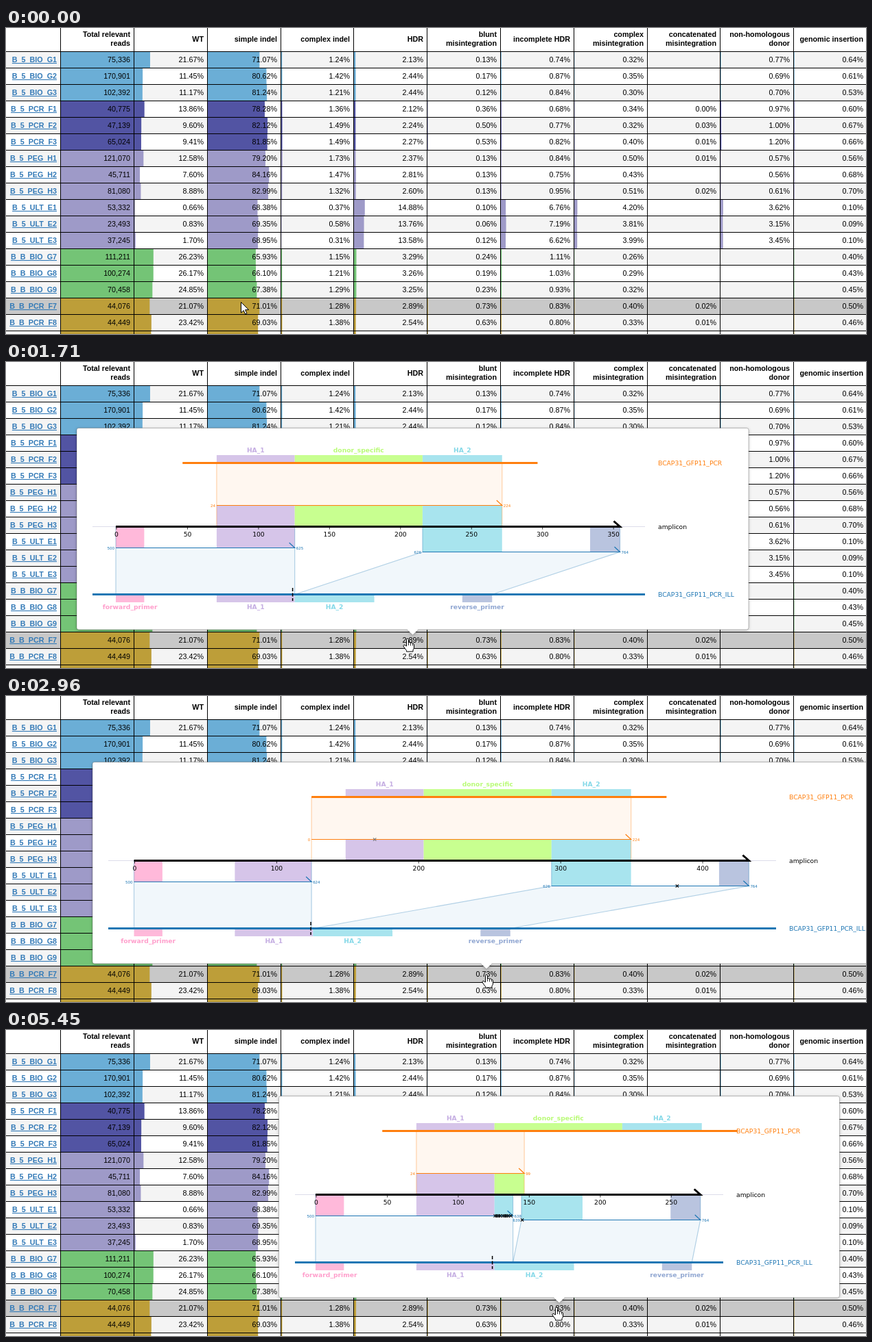
An HTML page that plays this animation: 1253 px wide and 447 px high, repeating every 7.16 s.

```html
<!DOCTYPE html>
<html lang="en">
<head>
<meta charset="utf-8">
<title>Read outcome table</title>
<style>
html, body { margin: 0; width: 100%; height: 100%; overflow: hidden; background: #fff; }
svg { display: block; width: 1253px; height: 447px; }
.table text { font: 10.75px "Liberation Sans", Arial, sans-serif; text-anchor: end; }
.table .bold { font-weight: bold; }
.table .link { fill: #337ab7; font-weight: bold; text-decoration: underline; }
.tip text { font: 9.2px "DejaVu Sans", sans-serif; }
.tip .mid { text-anchor: middle; }
.tip .end { text-anchor: end; }
.tip .bold { font-weight: bold; }
.tip .small { font-size: 5.5px; }
.panel { fill: #fff; stroke: rgba(0,0,0,.24); filter: drop-shadow(0 1px 2px rgba(0,0,0,.25)); }

.tip, #arrow, #hand { animation: 7160ms step-end infinite; }
#tip1 { animation-name: tip1; }
#tip2 { animation-name: tip2; }
#tip3 { animation-name: tip3; }
#tip4 { animation-name: tip4; }
#arrow { animation-name: arrow; }
#hand { animation-name: hand; }
#cursor { animation: move 7160ms step-end infinite; }

@keyframes tip1 {
  0% { opacity: 0 } 5.307% { opacity: .17 } 6.355% { opacity: .6 } 7.402% { opacity: 1 }
  12.988% { opacity: .8 } 14.064% { opacity: .35 } 15.126% { opacity: .05 } 16.201%, 100% { opacity: 0 }
}
@keyframes tip2 {
  0% { opacity: 0 } 21.648% { opacity: .17 } 22.765% { opacity: .6 } 23.882% { opacity: 1 }
  35.824% { opacity: .75 } 36.872% { opacity: .3 } 37.919%, 100% { opacity: 0 }
}
@keyframes tip3 {
  0% { opacity: 0 } 38.966% { opacity: .17 } 40.154% { opacity: .6 } 41.34% { opacity: 1 }
  67.304% { opacity: .75 } 68.408% { opacity: .3 } 69.511%, 100% { opacity: 0 }
}
@keyframes tip4 {
  0% { opacity: 0 } 73.911% { opacity: .17 } 75.014% { opacity: .6 } 76.117%, 100% { opacity: 1 }
}
@keyframes hand {
  0% { opacity: 0 } 5.307% { opacity: 1 } 12.988% { opacity: 0 } 20.573% { opacity: 1 }
  35.824% { opacity: 0 } 38.966% { opacity: 1 } 66.201% { opacity: 0 } 72.807%, 100% { opacity: 1 }
}
@keyframes arrow {
  0% { opacity: 1 } 5.307% { opacity: 0 } 12.988% { opacity: 1 } 20.573% { opacity: 0 }
  35.824% { opacity: 1 } 38.966% { opacity: 0 } 66.201% { opacity: 1 } 72.807%, 100% { opacity: 0 }
}
@keyframes move {
  0% { transform: translate(342px, 400px) }
  3.212% { transform: translate(342px, 400px); animation-timing-function: steps(4, jump-both) }
  7.402% { transform: translate(367px, 405px) }
  12.988% { transform: translate(367px, 405px); animation-timing-function: steps(3, jump-both) }
  16.201% { transform: translate(502px, 399px); animation-timing-function: steps(4, end) }
  20.573% { transform: translate(580px, 404px); animation-timing-function: steps(2, end) }
  22.765% { transform: translate(585px, 404px) }
  34.776% { transform: translate(585px, 404px); animation-timing-function: steps(4, jump-both) }
  38.966% { transform: translate(694px, 406px); animation-timing-function: steps(2, end) }
  41.34% { transform: translate(700px, 407px) }
  62.849% { transform: translate(703px, 408px) }
  64.106% { transform: translate(713px, 410px) }
  66.201% { transform: translate(713px, 410px); animation-timing-function: steps(6, jump-both) }
  72.807% { transform: translate(794px, 407px); animation-timing-function: steps(3, end) }
  76.117%, 100% { transform: translate(802px, 405px) }
}
</style>
</head>
<body>
<svg id="stage" viewBox="0 0 1253 447" xmlns="http://www.w3.org/2000/svg">
  <g id="table" class="table"></g>
  <g id="tips"></g>
  <g id="cursor" fill="#fff" stroke="#000" stroke-linejoin="round">
    <path id="arrow" d="M.5 .5V16L4.2 12.6L6.7 18L9 17L6.6 11.7H11.6Z"/>
    <g id="hand">
      <path d="M-1.5 11V1.5a1.5 1.5 0 0 1 3 0V6.5a1.5 1.3 0 0 1 3 .5a1.5 1.3 0 0 1 3 .7a1.4 1.4 0 0 1 2 1V13q0 2-1.5 3.5V19H-1.5V17.5L-5.5 12q-1.2-2 .3-2.6q1.4-.4 2.4 1Z"/>
      <path fill="none" stroke-width=".8" d="M1.5 6.5V10M4.5 7V10.5M7.5 8V10.5"/>
    </g>
  </g>
</svg>
<script>
const rows = `
B_5_BIO_G1 75,336 21.67 71.07 1.24 2.13 0.13 0.74 0.32 - 0.77 0.64
B_5_BIO_G2 170,901 11.45 80.62 1.42 2.44 0.17 0.87 0.35 - 0.69 0.61
B_5_BIO_G3 102,392 11.17 81.24 1.21 2.44 0.12 0.84 0.30 - 0.70 0.53
B_5_PCR_F1 40,775 13.86 78.28 1.36 2.12 0.36 0.68 0.34 0.00 0.97 0.60
B_5_PCR_F2 47,139 9.60 82.12 1.49 2.24 0.50 0.77 0.32 0.03 1.00 0.67
B_5_PCR_F3 65,024 9.41 81.85 1.49 2.27 0.53 0.82 0.40 0.01 1.20 0.66
B_5_PEG_H1 121,070 12.58 79.20 1.73 2.37 0.13 0.84 0.50 0.01 0.57 0.56
B_5_PEG_H2 45,711 7.60 84.16 1.47 2.81 0.13 0.75 0.43 - 0.56 0.68
B_5_PEG_H3 81,080 8.88 82.99 1.32 2.60 0.13 0.95 0.51 0.02 0.61 0.70
B_5_ULT_E1 53,332 0.66 68.38 0.37 14.88 0.10 6.76 4.20 - 3.62 0.10
B_5_ULT_E2 23,493 0.83 69.35 0.58 13.76 0.06 7.19 3.81 - 3.15 0.09
B_5_ULT_E3 37,245 1.70 68.95 0.31 13.58 0.12 6.62 3.99 - 3.45 0.10
B_B_BIO_G7 111,211 26.23 65.93 1.15 3.29 0.24 1.11 0.26 - - 0.40
B_B_BIO_G8 100,274 26.17 66.10 1.21 3.26 0.19 1.03 0.29 - - 0.43
B_B_BIO_G9 70,458 24.85 67.38 1.29 3.25 0.23 0.93 0.32 - - 0.45
B_B_PCR_F7 44,076 21.07 71.01 1.28 2.89 0.73 0.83 0.40 0.02 - 0.50
B_B_PCR_F8 44,449 23.42 69.03 1.38 2.54 0.63 0.80 0.33 0.01 - 0.46
B_B_PCR_F9 44,210 23.10 69.20 1.35 2.60 0.65 0.81 0.35 0.01 - 0.48
`.trim().split('\n').map(r => r.split(' '));
const heads = ['Total relevant|reads', 'WT', 'simple indel', 'complex indel', 'HDR', 'blunt|misintegration',
  'incomplete HDR', 'complex|misintegration', 'concatenated|misintegration', 'non-homologous|donor', 'genomic insertion'];
const groups = { B_5_BIO: '#6baed6', B_5_PCR: '#5254a3', B_5_PEG: '#9e9ac8', B_5_ULT: '#9e9ac8', B_B_BIO: '#74c476', B_B_PCR: '#bd9e39' };

const rect = (x, y, w, h, fill) => `<rect x="${x}" y="${y}" width="${w}" height="${h}" fill="${fill}"/>`;
const text = (s, x, y, cls = '', fill = '#000') => `<text x="${x}" y="${y}" class="${cls}" fill="${fill}">${s}</text>`;
const line = (d, stroke, w = 1, more = '') => `<path d="${d}" fill="none" stroke="${stroke}" stroke-width="${w}" ${more}/>`;
const colX = k => Math.round(79.2 + 106.8 * k);

function drawTable() {
  let out = '', lines = '';
  heads.forEach((h, k) => {
    const parts = h.split('|');
    parts.forEach((p, i) => out += text(p, colX(k + 1) - 5, parts.length > 1 ? 13 + 13 * i : 20, 'bold'));
    lines += `M${colX(k) + .5} 0V447`;
  });
  rows.forEach(([name, ...cells], i) => {
    const y = 35 + 24 * i, color = groups[name.slice(0, 7)];
    out += rect(0, y, 1253, 23, i == 15 ? '#c8c8c8' : i % 2 ? '#fff' : '#f4f4f4');
    out += text(name, 74, y + 15, 'link');
    cells.forEach((v, k) => {
      if (v == '-') return;
      out += rect(colX(k) + 1, y, k ? v * 1.06 : 106, 23, color);
      out += text(k ? v + '%' : v, colX(k + 1) - 5, y + 15);
    });
    lines += `M0 ${y - .5}H1253`;
  });
  return out + line(lines, '#000');
}

const BP = 2.069, BLUE = '#1f77b4', ORANGE = '#ff7f0e';
const FP = ['forward_primer', '#ffb9da', '#ff9fcc'], H1 = ['HA_1', '#d6c5e9', '#c5aee2'], H2 = ['HA_2', '#a8e4ee', '#86d9e8'],
  RP = ['reverse_primer', '#b9c4df', '#91a7d2'], DS = ['donor_specific', '#c8ff90', '#b9fb76'];

// Positions are in base pairs from x; reads are [amplicon start, end, reference start, first, last].
function drawTip(t, n) {
  const X = p => +(t.x + p * BP).toFixed(2), dy = t.dy || 0;
  const yAmp = 240.5 + dy, yRef = 339.5 + dy, yTop = 147.5, yPcr = 209.5, yRead = [271.5 + dy, 277.5 + dy];
  const box = (part, a, b, y1, y2) => rect(X(a), y1, (b - a) * BP, y2 - y1, part[1]);
  const name = (part, a, b, y) => text(part[0], X((a + b) / 2), y, 'mid bold', part[2]);
  const top = t.top, bottom = t.bottom, mid = t.mid, left = 2 * mid - t.right;

  let out = `<path class="panel" d="M${left + 3} ${top}H${t.right - 3}q3 0 3 3V${bottom - 3}q0 3-3 3H${mid + 8}L${mid} ${bottom + 8}L${mid - 8} ${bottom}H${left + 3}q-3 0-3-3V${top + 3}q0-3 3-3Z"/>`;
  out += line(`M${t.l} ${yAmp}H${t.r}`, '#dcdcea');

  let areas = '', edges = '', reads = '';
  const addRead = ([a, b, ref, first, last], y, yr, color) => {
    const A = X(a), B = X(b), C = X(ref), D = X(ref + b - a);
    areas += `<path d="M${A} ${y}H${B}L${D} ${yr}H${C}Z" fill="${color}" opacity=".06"/>`;
    edges += line(`M${A} ${yAmp}V${y}L${C} ${yr}M${B} ${yAmp}V${y}L${D} ${yr}`, color, 1.2, 'opacity=".33"');
    reads += line(`M${A} ${y}H${B}l-8-7.5`, color, 1.2);
    reads += text(first, A - 2, y + 2, 'end small', color) + text(last, B + 2, y + 2, 'small', color);
  };
  t.reads.forEach((r, i) => addRead(r, yRead[i], yRef, BLUE));
  if (t.pcrRead) addRead(t.pcrRead, yPcr, yTop, ORANGE);
  out += areas;

  out += box(FP, 0, 20, yAmp, yRead[0]) + box(RP, t.len - 21, t.len, yAmp, yRead[1]);
  t.low.forEach(([part, a, b, i]) => out += box(part, a, b, yAmp, yRead[i]));
  (t.up || []).forEach(([part, a, b]) => out += box(part, a, b, yPcr, yAmp));
  [[FP, 0, 20], [H1, 71, 126], [H2, 126, 182], [RP, 244, 265]].forEach(([part, a, b]) =>
    out += box(part, a, b, yRef, yRef + 11.5) + name(part, a, b, yRef + 21));

  if (t.pcrRead) {
    const p = t.pcr;
    [[H1, 24, 79], [DS, 79, 169], [H2, 169, 225]].forEach(([part, a, b]) =>
      out += box(part, p + a, p + b, 136, yTop) + name(part, p + a, p + b, 131.5));
    out += line(`M${X(p)} ${yTop}H${X(p + 250)}`, ORANGE, 3);
    out += text('BCAP31_GFP11_PCR', t.r + 19, 150.5, '', ORANGE);
  }
  out += edges + reads;
  out += line(`M${t.l} ${yRef}H${t.r}`, BLUE, 3);
  out += line(`M${X(124.5)} ${yRef - 9.5}v19`, '#000', 1.5, 'stroke-dasharray="5 2.5"');

  for (let p = 0; p <= t.len - 5; p += t.tick) {
    out += line(`M${X(p + .5)} ${yAmp}v4`, '#000', .8) + text(p, X(p + .5), yAmp + 14.5, 'mid');
  }
  out += line(`M${X(0)} ${yAmp}H${X(t.len)}l-9-8`, '#000', 3);
  (t.marks || []).forEach(([p, y, color]) =>
    out += line(`M${X(p) - 2.2} ${y - 2.2}l4.4 4.4m0-4.4l-4.4 4.4`, color, 1.1));
  out += text('amplicon', t.r + 19, yAmp + 3) + text('BCAP31_GFP11_PCR_ILL', t.r + 19, yRef + 3, '', BLUE);
  return `<g class="tip" id="tip${n + 1}">${out}</g>`;
}

const mismatch = [126, 127.2, 128.4, 129.6, 131.6, 132.8, 134, 135.2, 137].map(p => [p + .5, 271.5, '#000']);
const tips = [
  { x: 41, dy: 9, len: 261, l: 11, r: 613.5, top: 214.5, bottom: 390, mid: 377, right: 764.5, tick: 50,
    low: [[H1, 71, 126, 0], [H2, 126, 178, 1]],
    reads: [[0, 126, 0, 500, 625], [126, 261, 130, 630, 764]] },
  { x: 160, len: 355, l: 126, r: 931, top: 96.5, bottom: 391, mid: 592.5, right: 1082, tick: 50, pcr: 47,
    low: [[H1, 71, 126, 0], [H2, 216, 272, 1]],
    up: [[H1, 71, 126], [DS, 126, 216], [H2, 216, 272]],
    reads: [[0, 126, 0, 500, 625], [216, 355, 126, 626, 764]], pcrRead: [71, 272, 71, 24, 224] },
  { x: 186.5, len: 433, l: 149, r: 1122, top: 96.5, bottom: 391, mid: 700, right: 1274, tick: 100, pcr: 125,
    low: [[H1, 71, 125, 0], [H2, 294, 350, 1]],
    up: [[H1, 149, 204], [DS, 204, 294], [H2, 294, 350]],
    reads: [[0, 125, 0, 500, 624], [294, 433, 126, 626, 764]], pcrRead: [125, 350, 125, 0, 224],
    marks: [[169.5, 209.5, '#777'], [382.5, 277.5, '#000']] },
  { x: 451, len: 271, l: 421, r: 1045, top: 96.5, bottom: 391, mid: 806, right: 1214.5, tick: 50, pcr: 47,
    low: [[H1, 71, 126, 0], [H2, 126, 139, 0], [H2, 145, 188, 1]],
    up: [[H1, 71, 126], [DS, 126, 147]],
    reads: [[0, 139, 0, 500, 638], [145, 271, 139, 639, 764]], pcrRead: [71, 147, 71, 24, 99],
    marks: [...mismatch, [145.5, 277.5, '#000']] }
];

document.getElementById('table').innerHTML = drawTable();
document.getElementById('tips').innerHTML = tips.map(drawTip).join('');
</script>
</body>
</html>
```
